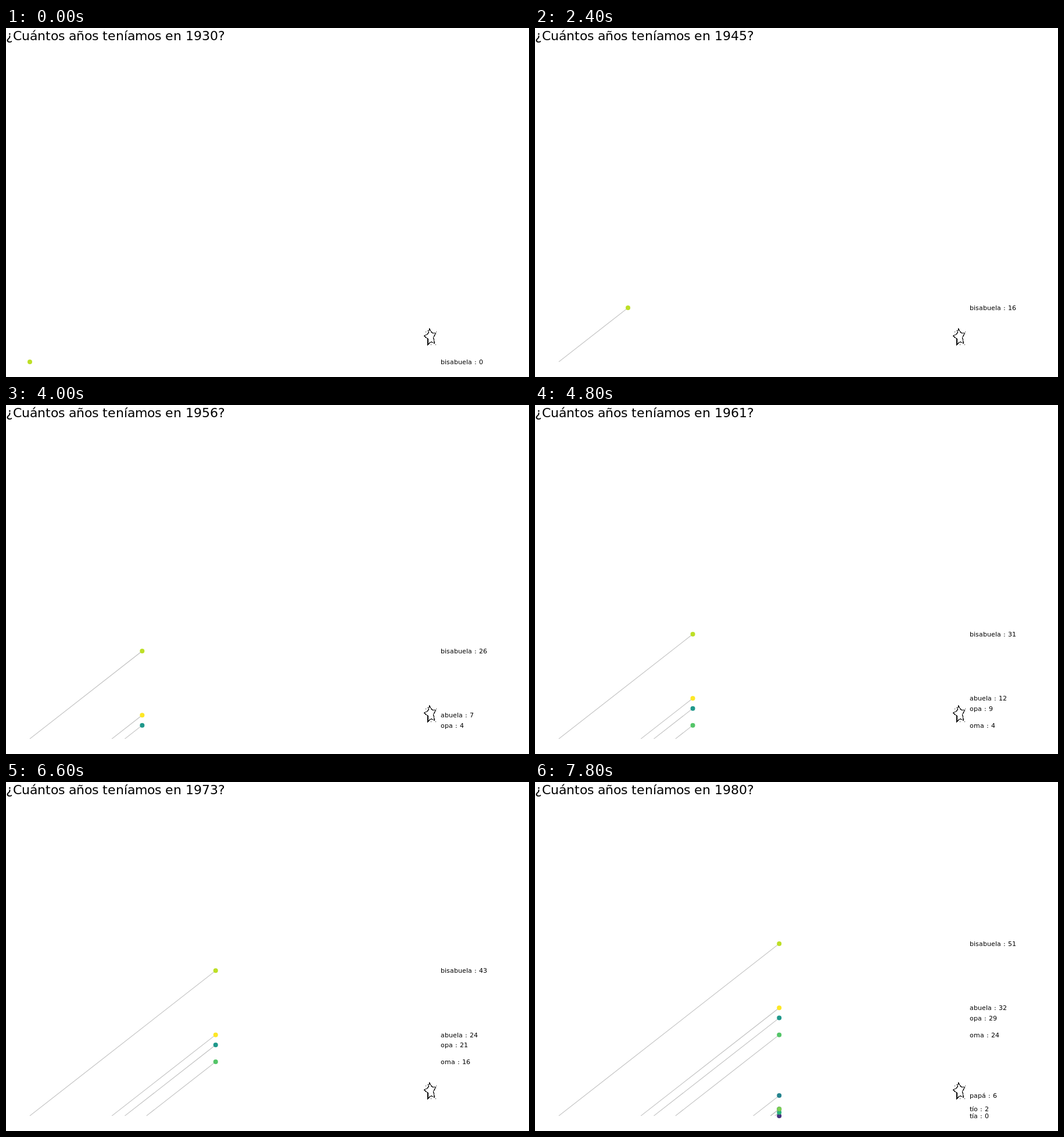
Recreate the animation shown at these times as an HTML page. Size 900 by 600 pixels, loop 8000 ms.

```html
<!DOCTYPE html>
<html lang="es">
<head>
<meta charset="utf-8">
<title>¿Cuántos años teníamos?</title>
<style>
  html, body { margin: 0; width: 100%; height: 100%; overflow: hidden; background: #fff; }
  svg { display: block; width: 900px; height: 600px; }
  text { font-family: "DejaVu Sans", sans-serif; white-space: pre; }
  #title { font-size: 22px; }
  .label { font-size: 11px; }
  .trail { stroke: #bebebe; stroke-width: 1.07; }
  #star { shape-rendering: crispEdges; }
</style>
</head>
<body>
<svg viewBox="0 0 900 600">
  <g id="lines"></g>
  <g id="dots"></g>
  <g id="labels"></g>
  <g id="star">
    <path d="M728.5 517L733 524L739.5 525L735.5 532L737.5 542L731.5 539.5L726 544.5L726 534.5L719.5 529.5L726.5 525.5Z"
          fill="none" stroke="#000" stroke-width="1.2"/>
    <path d="M722 522h1v1h-1zM725 520h1v1h-1zM740 522h1v1h-1zM731 544h1v1h-1zM739 544h1v1h-1z"/>
  </g>
  <text id="title" y="21"></text>
</svg>
<script>
const FRAME_MS = 200, FRAMES = 40, FIRST_YEAR = 1930;
const LABEL_X = 748;
const yearX = year => 41 + 7.436 * year;
const ageY = age => 573.9 - 5.803 * age;

// Birth years count from FIRST_YEAR; people without a name have no label.
const people = [
  { name: "", born: 51, color: "#46327e", label: "tía" },
  { name: "", born: 50, color: "#2db27d" },
  { name: "", born: 49, color: "#414487" },
  { name: "bisabuela", born: 0, color: "#bddf26" },
  { name: "abuela", born: 19, color: "#fde725" },
  { name: "opa", born: 22, color: "#1f988b" },
  { name: "oma", born: 27, color: "#54c568" },
  { name: "papá", born: 45, color: "#25838e" },
  { name: "tío", born: 49, color: "#7ad151" }
];

const byId = id => document.getElementById(id);
const pen = document.createElement("canvas").getContext("2d");
pen.font = '2048px "DejaVu Sans", sans-serif';

function setAttrs(node, attrs) {
  for (const key in attrs) node.setAttribute(key, attrs[key]);
  return node;
}

function add(parentId, tag, attrs) {
  const node = document.createElementNS("http://www.w3.org/2000/svg", tag);
  return byId(parentId).appendChild(setAttrs(node, attrs));
}

// Places every glyph on whole pixels, as hinted text does.
function setText(node, string, x, size) {
  const places = [];
  for (const char of string) {
    places.push(x);
    x += Math.round(pen.measureText(char).width * size / 2048);
  }
  node.setAttribute("x", places.join(" "));
  node.textContent = string;
}

for (const person of people) {
  person.line = add("lines", "line", { class: "trail", x1: yearX(person.born), y1: ageY(0) });
  person.dot = add("dots", "circle", { r: 4, fill: person.color });
  person.text = add("labels", "text", { class: "label" });
}

function draw(step) {
  // The title truncates the running time, the marks snap to the latest whole year.
  const titleYear = FIRST_YEAR + Math.floor(step * 30 / 23);
  const year = Math.floor((30 * step + 15 - step % 2) / 23);
  setText(byId("title"), `¿Cuántos años teníamos en ${titleYear}?`, 0, 22);

  for (const { name, label = name, born, line, dot, text } of people) {
    const age = year - born, x = yearX(year), y = ageY(age);
    const display = age < 0 ? "none" : "inline";
    for (const node of [line, dot, text]) node.style.display = display;
    if (age < 0) continue;
    setAttrs(line, { x2: x, y2: y });
    setAttrs(dot, { cx: x, cy: y });
    setAttrs(text, { y: Math.round(y) + 4 });
    if (label) setText(text, `${label} : ${age}`, LABEL_X, 11.04);
  }
}

let shown = -1;
function tick(now) {
  const step = Math.floor(now / FRAME_MS) % FRAMES;
  if (step !== shown) draw(shown = step);
  requestAnimationFrame(tick);
}
draw(0);
requestAnimationFrame(tick);
</script>
</body>
</html>
```
